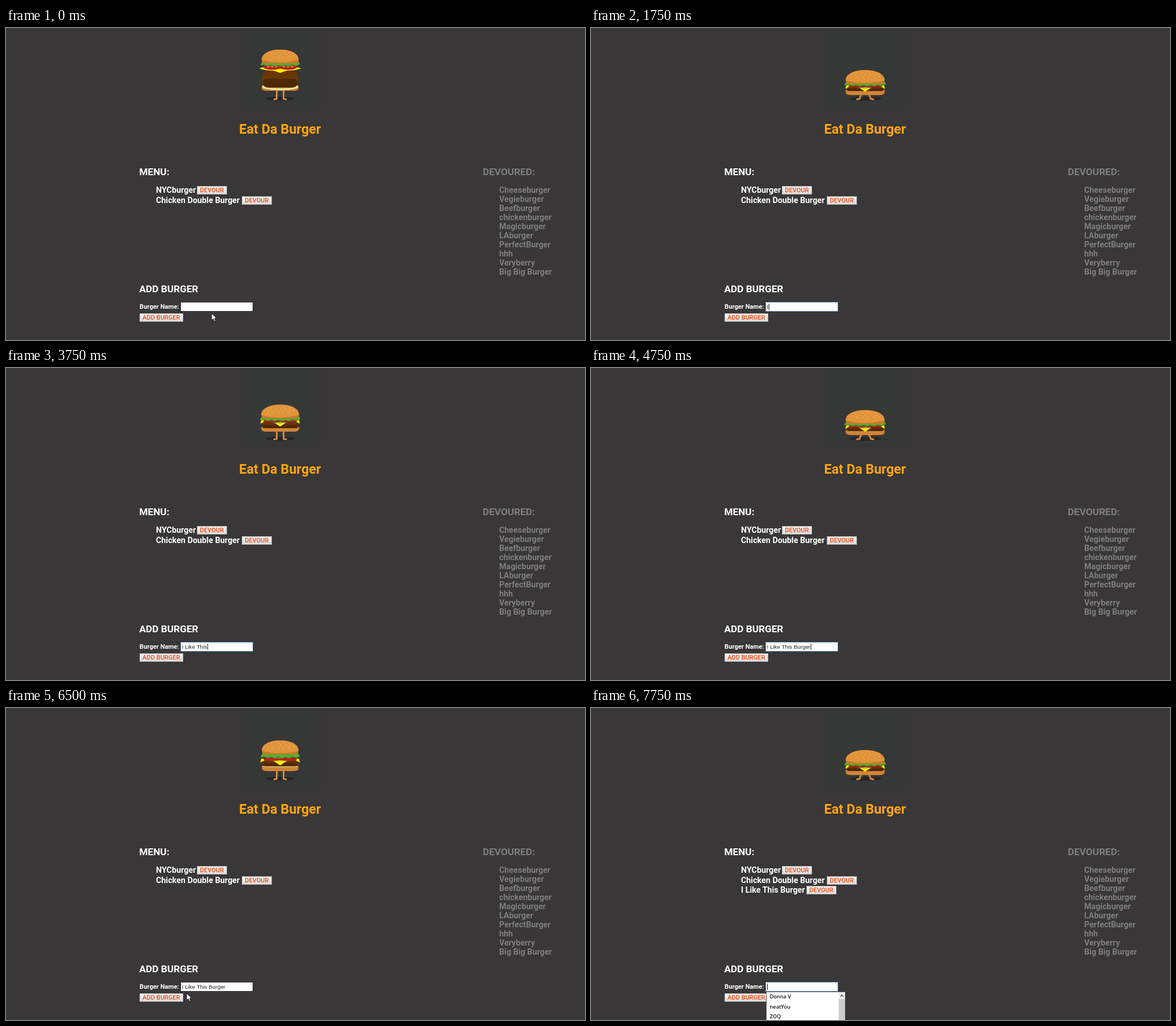
An HTML page that plays this animation: 1019x549 px, repeating every 8000 ms.

```html
<!DOCTYPE html>
<html lang="en">
<head>
<meta charset="utf-8">
<title>Burger menu</title>
<style>
html, body { margin: 0; width: 100%; height: 100%; overflow: hidden; background: #393737; }
svg { display: block; width: 100%; height: 100%; }
text { font-family: Roboto, "Liberation Sans", sans-serif; font-weight: 700; fill: #fff; white-space: pre; }
.title { font-size: 23.4px; fill: #ffa50f; }
.head { font-size: 17.2px; }
.item { font-size: 14.3px; }
.label { font-size: 11.2px; }
.gray { fill: #7f7e7e; }
.btn { font-size: 11px; font-weight: 500; fill: #f04a14; }
#typed { font: 9.8px "Liberation Sans", Arial, sans-serif; fill: #222; }
.option { font: 600 9.2px "Open Sans", "Noto Sans", sans-serif; fill: #111; }
</style>
</head>
<body>
<svg viewBox="0 0 1019 549">
  <defs>
    <linearGradient id="face" x2="0" y2="1">
      <stop stop-color="#f4f4f4"/><stop offset="1" stop-color="#dadada"/>
    </linearGradient>
  </defs>
  <rect width="1019" height="549" fill="#393737"/>
  <rect x="410" width="145" height="138" fill="#363737"/>
  <g id="burger" transform="translate(482.5 0)"></g>
  <g id="page"></g>
  <g id="newItem"></g>
  <rect x="308" y="483" width="126" height="15" fill="#fff"/>
  <rect id="ring" x="307.5" y="482.5" width="127" height="16" fill="none" stroke="#5d87c6"/>
  <path id="beam" d="M-2.5-6.5h5M0-6.5v14M-2.5 7.5h5" stroke="#fff" fill="none"/>
  <text id="typed" x="309.5" y="494"></text>
  <rect id="caret" y="485" width="1" height="11" fill="#111"/>
  <g id="list"></g>
  <path id="arrow" d="M0 0V12.2L2.8 9.6 4.8 14.2 6.8 13.3 4.9 8.9H8.4Z" fill="#fff" stroke="#111" stroke-width=".8"/>
</svg>
<script>
const LOOP = 8000, STEP = 250;
const $ = id => document.getElementById(id);
const show = (el, on) => el.setAttribute("visibility", on ? "visible" : "hidden");
const text = (cls, x, y, s) => `<text class="${cls}" x="${x}" y="${y}">${s}</text>`;
const button = (x, y, w, s, id = "") =>
  `<rect id="${id}" x="${x + .5}" y="${y + .5}" width="${w - 1}" height="14" fill="url(#face)" stroke="#a9a9a9"/>` +
  text("btn", x + 5.3, y + 11.4, s);
const menuItem = (row, s, x) => {
  const y = 290 + row * 17.5;
  return text("item", 264, y, s) + button(x, Math.round(y - 12), 53, "DEVOUR");
};

const eaten = ["Cheeseburger", "Vegieburger", "Beefburger", "chickenburger", "Magicburger",
  "LAburger", "PerfectBurger", "hhh", "Veryberry", "Big Big Burger"];

$("page").innerHTML =
  text("title", 410.3, 186, "Eat Da Burger") +
  text("head", 234.5, 259, "MENU:") +
  menuItem(0, "NYCburger", 336) +
  menuItem(1, "Chicken Double Burger", 415) +
  text("head gray", 839, 259, "DEVOURED:") +
  eaten.map((s, i) => text("item gray", 868, 290 + i * 16, s)).join("") +
  text("head", 234.5, 464.5, "ADD BURGER") +
  text("label", 235, 494, "Burger Name:") +
  button(235, 502, 77, "ADD BURGER", "add");

$("newItem").innerHTML = menuItem(2, "I Like This Burger", 379);

$("list").innerHTML =
  `<rect x="308.5" y="499.5" width="139" height="60" fill="#fff" stroke="#555"/>
   <rect x="436" y="500" width="11" height="49" fill="#f0f0f0"/>
   <rect x="436" y="512" width="11" height="37" fill="#cdcdcd"/>
   <path d="M439 508l2.5-3 2.5 3" fill="none" stroke="#505050" stroke-width="1.3"/>` +
  ["Donna V", "neatYou", "ZOQ"].map((s, i) => text("option", 314.5, 511 + i * 17.5, s)).join("");

// Pose: bun top, lettuce, cheese, patty top, patty bottom, base top, base bottom, half width, drape, leg splay
const FALL    = [38, 63, 71, 74, 105, 97, 110.5, 32.5, 0, 0];
const SQUASH  = [74, 98, 104, 101, 111, 108, 118, 34.2, 1, 1];
const OPEN    = [4, 31, 50, 61, 79, 96, 112, 33, 0, 0];
const STAND   = [64.5, 89, 95, 94, 106, 103, 112, 33.3, 1, 0];
const STRETCH = [57, 84, 93, 91, 102.5, 101, 111, 32.2, 1, 0];
const mix = (a, b, k) => a.map((v, i) => v + (b[i] - v) * k);
const poses = [FALL, mix(FALL, STRETCH, .47), STRETCH, STAND, mix(STRETCH, STAND, .6),
  mix(STAND, SQUASH, .1), mix(STAND, SQUASH, .65), SQUASH, mix(SQUASH, STRETCH, .5),
  mix(STRETCH, OPEN, .5), mix(STRETCH, OPEN, .97), OPEN];

const path = (d, fill, extra = "") => `<path d="${d}" fill="${fill}" ${extra}/>`;
const oval = (x, y, rx, ry, fill) => `<ellipse cx="${x}" cy="${y}" rx="${rx}" ry="${ry}" fill="${fill}"/>`;
const block = (w, y, h, r, fill) =>
  `<rect x="${-w}" y="${y}" width="${2 * w}" height="${h}" rx="${r}" fill="${fill}"/>`;

function leaf(w, y, low, fill) {
  let d = `M${-w + 3} ${y - 4}H${w - 3}Q${w} ${y - 3} ${w} ${y + 1}`;
  for (let x = w; x >= -w; x--) {
    const droop = low * Math.sqrt(1 - (x / w) ** 2 * .7);
    d += `L${x} ${y + droop + .8 * Math.sin(x * .5)}`;
  }
  return path(d + `L${-w} ${y + 1}Z`, fill);
}

function topBun(s, t) {
  const b = t + 24;
  const dome = `M${-s} ${b - 6}C${-s} ${t + 6.5} ${-s * .55} ${t} 0 ${t}S${s} ${t + 6.5} ${s} ${b - 6}`;
  let out = path(dome + `Q${s} ${b} ${s - 6} ${b}H${6 - s}Q${-s} ${b} ${-s} ${b - 6}Z`, "#cb7a2a") +
    path(dome + `Q0 ${b + 3} ${-s} ${b - 6}Z`, "#e2943b");
  for (let i = 0; i < 22; i++) {
    const a = i * 2.4, r = Math.sqrt(i / 22);
    out += oval(r * Math.cos(a) * s * .75, t + 10 + r * Math.sin(a) * 7, .9, .6, "#f2bd72");
  }
  return out;
}

function cheese(y, d) {
  const tip = 37 - 2 * d, hang = y + 3 * d, edge = y + 3 * (1 - d);
  const half = k => [[k * tip, hang], [k * 27, edge - d], [k * 12, edge + 1 - d]];
  const back = [[33, y - 4], [-33, y - 4]].map(([x, h]) => [x * (1 - .3 * (1 - d)), h]);
  return path("M" + [...half(-1), [0, y + 8], ...half(1).reverse(), ...back].join("L") + "Z", "#fff000");
}

function tomato(x, y, d) {
  const ry = 4.3 - 2 * d;
  let out = oval(x, y + .6, 15.5, ry, "#8f1010") + oval(x, y, 15.3, ry - .4, "#c9201c");
  for (const k of [-1, 0, 1]) out += oval(x + k * 7, y - .4, 2.4, .9 * (1 - d), "#ef9a86");
  return out;
}

function burger([top, leafY, cheeseY, p, q, b, g, s, d, k]) {
  const ry = 6 - 4.8 * d, rim = b + ry;
  const leg = m => {
    const foot = m * (6 + 4 * k);
    return path(`M${m * 6} ${g - 2}Q${m * (6 + 3 * k)} ${g + 3} ${foot} 124.8l${m * 4.5} .8`, "none",
      `stroke="#d08a45" stroke-width="3" stroke-linejoin="round" stroke-linecap="round"`);
  };
  const red = leafY + .66 * (cheeseY - leafY), ph = q - p;
  return oval(0, 124.5, 26 + 3 * k, 3.6, "#262727") + leg(-1) + leg(1) +
    path(`M${-s} ${rim}A${s} ${ry} 0 0 1 ${s} ${rim}V${g - 5}Q${s} ${g} ${s - 9} ${g}H${9 - s}Q${-s} ${g} ${-s} ${g - 5}Z`, "#d08534") +
    oval(0, rim + .5, s - 1, ry, "#f5e79a") + oval(0, rim + .5, s * .7, ry * .62, "#c9c977") +
    block(s - .5, p, ph, Math.min(13, ph / 2), "#673608") +
    block(s - 2, p + ph * .5, ph * .48, ph * .24, "#4f2906") +
    cheese(cheeseY, d) + oval(-1, leafY + 6, 12, 2.6, "#a5ad4c") +
    tomato(14, red, d) + tomato(-14, red, d) +
    leaf(s + 1.8, leafY, 4.5, "#3f7d22") + leaf(s + 1.8, leafY, 3, "#64a633") + topBun(s, top);
}

// Piecewise linear track of [step, value]
function track(keys, n) {
  let i = 0;
  while (i < keys.length - 2 && n >= keys[i + 1][0]) i++;
  const [a, u] = keys[i], [c, v] = keys[i + 1];
  return u + (v - u) * Math.min(1, Math.max(0, (n - a) / (c - a)));
}
const PHRASE = "I Like This Burger";
const typedKeys = [[6, 0], [7, 1], [11, 5], [15, 11], [19, 18]];
const mouseX = [[0, 362], [1, 356], [20, 356], [23, 292], [24, 292], [26, 318], [28, 349]];
const mouseY = [[0, 502], [1, 490], [20, 490], [22, 515], [24, 514], [26, 502], [28, 490]];

function draw(n) {
  $("burger").innerHTML = burger(poses[n % 12]);
  const sent = n >= 27, x = track(mouseX, n), y = track(mouseY, n);
  const focus = (n >= 2 && n < 23) || n >= 29;
  const overField = (n >= 1 && n <= 20) || n >= 28;
  $("typed").textContent = sent ? "" : PHRASE.slice(0, Math.round(track(typedKeys, n)));
  $("caret").setAttribute("x", 310 + $("typed").getComputedTextLength());
  show($("ring"), focus);
  show($("caret"), focus);
  show($("newItem"), sent);
  show($("list"), (n >= 3 && n < 7) || n >= 30);
  $("add").setAttribute("stroke", n >= 22 && n < 26 ? "#777" : "#a9a9a9");
  show($("arrow"), !overField);
  show($("beam"), overField);
  for (const id of ["arrow", "beam"]) $(id).setAttribute("transform", `translate(${x} ${y})`);
}

let last = -1;
function tick() {
  const n = Math.floor(performance.now() % LOOP / STEP);
  if (n !== last) draw(last = n);
  requestAnimationFrame(tick);
}
tick();
</script>
</body>
</html>
```
